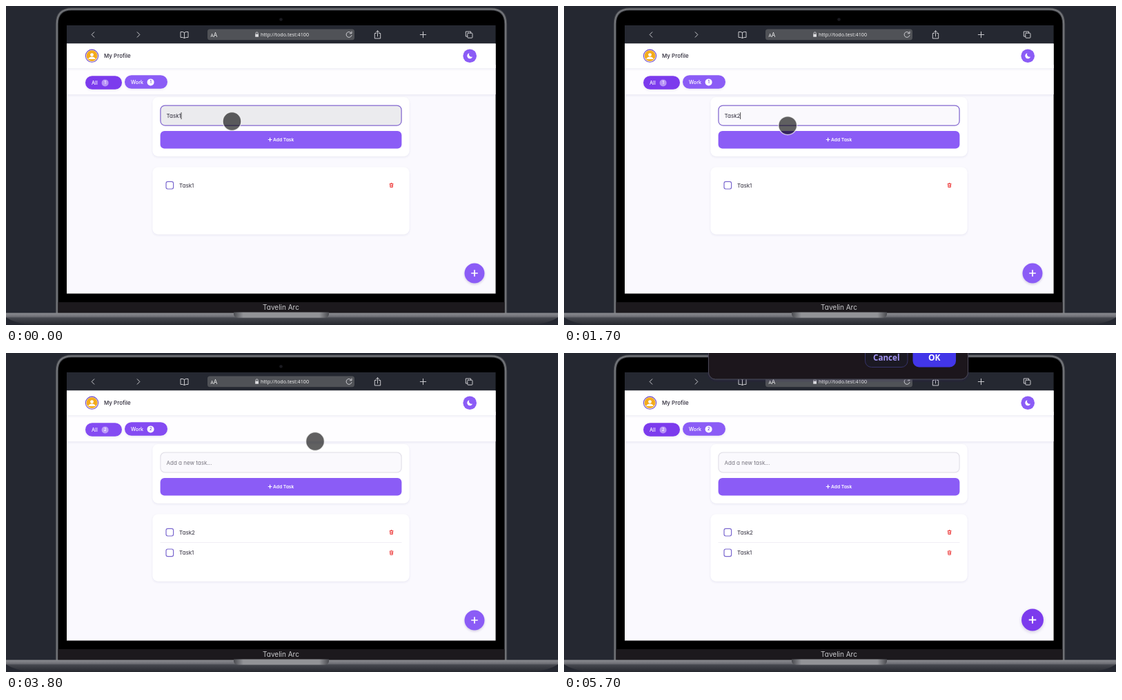
These frames come from a looping animation (800 by 462 pixels, 8000 ms). An HTML page:

```html
<!DOCTYPE html>
<html lang="en">
<head>
<meta charset="utf-8">
<title>Task list</title>
<style>
  html, body { margin: 0; width: 100%; height: 100%; overflow: hidden; background: #252831; }
  svg { display: block; width: 100vw; height: 100vh; }
  text { font-family: Inter, sans-serif; font-size: 8px; font-feature-settings: "cv11"; fill: #2c2938; white-space: pre; }
  .mid { text-anchor: middle; }
  .tab { font-size: 7.2px; font-weight: 500; fill: #fff; }
  .badge { font-size: 5.5px; font-weight: 600; text-anchor: middle; }
  .bar { fill: none; stroke: #d2d2d6; stroke-width: .95; stroke-linecap: round; stroke-linejoin: round; }
  .wide, .wide text { font-family: "Noto Sans", sans-serif; }
</style>
</head>
<body>
<svg viewBox="0 0 800 462">
  <defs>
    <linearGradient id="base" x2="0" y2="1">
      <stop offset="0" stop-color="#8b8c91"/><stop offset=".3" stop-color="#707177"/>
      <stop offset=".42" stop-color="#45474e"/><stop offset="1" stop-color="#26282f"/>
    </linearGradient>
    <linearGradient id="lip">
      <stop offset="0" stop-color="#4a4b50"/><stop offset=".1" stop-color="#929397"/>
      <stop offset=".9" stop-color="#929397"/><stop offset="1" stop-color="#4a4b50"/>
    </linearGradient>
    <filter id="soft" x="-20%" y="-40%" width="140%" height="200%">
      <feDropShadow dx="0" dy="1.3" stdDeviation="1.8" flood-color="#3b2a70" flood-opacity=".09"/>
    </filter>
    <filter id="lift" x="-40%" y="-40%" width="180%" height="200%">
      <feDropShadow dx="0" dy="1.5" stdDeviation="1.8" flood-color="#3b2a70" flood-opacity=".22"/>
    </filter>
    <clipPath id="page"><rect x="88" y="54.6" width="621.6" height="362"/></clipPath>
    <g id="trash" fill="none" stroke="#ef4444" stroke-width=".95">
      <path d="M-2.8-2.2H2.8M-1-3.1H1M-2.1-2L-1.7 2.9H1.7L2.1-2M-.7-1V2M.7-1V2"/>
    </g>
    <rect id="check" x="-5.3" y="-5.3" width="10.6" height="10.6" rx="2.4" fill="#fff" stroke="#7b68cf" stroke-width="1.2"/>
    <path id="shell" d="M73.8 446V26Q73.8 4.6 95 4.6H703Q724.2 4.6 724.2 26V446Z"/>
  </defs>

  <!-- laptop -->
  <rect width="800" height="462" fill="#252831"/>
  <use href="#shell" fill="#000" stroke="#42444a" stroke-width="4"/>
  <use href="#shell" fill="none" stroke="#74767a" stroke-width="2"/>
  <rect x="75.5" y="429" width="647" height="16" fill="#1c191d"/>
  <circle cx="398.5" cy="19.5" r="2.3" fill="#1a1a20"/>
  <text class="mid" x="398.5" y="440.3" style="font-size:10px;fill:#c9c9cc">Tavelin Arc</text>
  <path d="M0 444.5H800V451Q786 460 762 462H38Q14 460 0 451Z" fill="url(#base)"/>
  <path d="M330 443.5H468V447Q467 451.5 461 451.5H337Q331 451.5 330 447Z" fill="url(#lip)"/>

  <!-- browser bar -->
  <rect x="88" y="28" width="621.6" height="27" fill="#252831"/>
  <rect x="292" y="33.5" width="213" height="15.7" rx="3.5" fill="#505257"/>
  <g class="bar">
    <path d="M127.8 37.8L124.2 41.5L127.8 45.2M190.2 37.8L193.8 41.5L190.2 45.2"/>
    <path d="M258.5 38.5Q256 36.8 253 37.5V45.5Q256 45 258.5 46.5Q261 45 264 45.5V37.5Q261 36.8 258.5 38.5V46.5"/>
    <path d="M500.6 39.4A4 4 0 1 0 501 42.5M501 37V39.8H498.2"/>
    <path d="M536.5 39.5H534.3V47H542.7V39.5H540.5M538.5 44V36M536.2 38L538.5 35.8L540.8 38"/>
    <path d="M604.5 37.3V45.7M600.3 41.5H608.7"/>
    <path d="M668.8 44H666.3V37H673.6V39.2"/>
    <rect x="668.8" y="39.2" width="7.2" height="7" rx="1"/>
    <path d="M362 40.8V39.5A1.6 1.6 0 0 1 365.2 39.5V40.8"/>
  </g>
  <rect x="361.2" y="40.8" width="4.8" height="4" rx=".6" fill="#dddde0"/>
  <g class="wide">
    <text x="296.5" y="45" style="font-size:6.5px;fill:#eee">A<tspan font-size="8.5">A</tspan></text>
    <text x="369" y="44.2" style="font-size:7.2px;fill:#eee">http://todo.test:4100</text>
  </g>

  <!-- page -->
  <g clip-path="url(#page)">
    <rect x="88" y="54" width="622" height="363" fill="#faf9fe"/>
    <rect x="80" y="85" width="640" height="43" fill="#fefdff" filter="url(#soft)"/>
    <rect x="80" y="50" width="640" height="40" fill="#fff" filter="url(#soft)"/>
    <circle cx="124.5" cy="72.2" r="9.1" fill="#fff" stroke="#6a45c8" stroke-width="1.1"/>
    <circle cx="124.5" cy="72.2" r="7.9" fill="#f3ab1c"/>
    <path d="M119.2 77Q120.2 73.4 124.5 73.4T129.8 77Z" fill="#fff"/>
    <circle cx="124.5" cy="70.6" r="2.4" fill="#fff"/>
    <text x="142" y="75.2" font-weight="500">My Profile</text>
    <circle cx="672.2" cy="72.2" r="9.8" fill="#8b5cf6"/>
    <path d="M671.3 68.2A4.1 4.1 0 1 0 676.2 73.6A4 4 0 0 1 671.3 68.2Z" fill="#fff"/>

    <g filter="url(#soft)">
      <rect id="all" x="115" y="101.2" width="53" height="19.6" rx="9.8"/>
      <rect id="work" x="172" y="100.2" width="62" height="19.6" rx="9.8"/>
    </g>
    <text class="tab" x="124" y="113.8">All</text>
    <circle cx="143.6" cy="111.4" r="5" fill="#fff" fill-opacity=".45"/>
    <text class="badge count" x="143.6" y="113.4" style="fill:#fff"></text>
    <text class="tab" x="181" y="112.5">Work</text>
    <circle cx="209.6" cy="110.4" r="5" fill="#fff"/>
    <text class="badge count" x="209.6" y="112.4" style="fill:#6d3fd8"></text>

    <rect x="212.5" y="132" width="372" height="85.5" rx="8" fill="#fff" filter="url(#soft)"/>
    <rect id="field" x="223.9" y="144" width="349.2" height="29" rx="6.5"/>
    <text id="entry" x="232.5" y="161.7"></text>
    <path id="caret" stroke="#222" stroke-width=".8"/>
    <g id="add">
      <rect id="addBox" x="223.6" y="181.1" width="349.8" height="25.4" rx="6"/>
      <path d="M382.6 190.7V196.3M379.8 193.5H385.4" stroke="#fff" stroke-width="1.2"/>
      <text x="387" y="196" style="font-size:6.7px;font-weight:600;fill:#fff">Add Task</text>
    </g>

    <rect x="212.5" y="233.5" width="372" height="97" rx="8" fill="#fff" filter="url(#soft)"/>
    <path id="rule" d="M223.5 274.5H573.5" stroke="#f0eef5"/>
    <g id="rows"></g>

    <g id="fab">
      <circle id="fabDisc" r="14.5" filter="url(#lift)"/>
      <path d="M-4.8 0H4.8M0-4.8V4.8" stroke="#fff" stroke-width="1.7"/>
    </g>
  </g>

  <!-- pointers -->
  <circle id="dot" r="13.4" fill="#000" fill-opacity=".62" stroke="#fff" stroke-opacity=".7" stroke-width="1.4"/>
  <path id="hand" d="M676.4 399V389.6Q677.8 387 679.4 389.6V394.4Q681.4 393.2 682.2 394.8Q684.2 393.8 684.9 395.6Q687.2 395 687.3 397.6Q687.6 401 685.8 403V405.2H678.6V403.4Q675.6 400.6 673.8 397.4Q674.4 395.4 676.4 399Z" fill="#000" stroke="#000" stroke-width=".7" stroke-linejoin="round"/>

  <!-- dialog -->
  <g id="dialog" class="wide">
    <rect x="209.5" y="-30" width="376" height="68" rx="10" fill="#1a171f" stroke="#4b4955" filter="url(#lift)"/>
    <rect x="436.5" y="-12" width="61.5" height="32.5" rx="9" fill="#1b1923" stroke="#35336a"/>
    <rect x="505.5" y="-12" width="62.5" height="32.5" rx="9" fill="#4236e8"/>
    <text class="mid" x="467.3" y="11" style="font-size:11.6px;font-weight:600;fill:#a394f5">Cancel</text>
    <text class="mid" x="536.7" y="11" style="font-size:12px;font-weight:600;fill:#fff">OK</text>
  </g>
</svg>
<script>
const LOOP = 8000, STEP = 100;
const $ = id => document.getElementById(id);
const counts = document.querySelectorAll('.count');
const LIGHT = [139, 92, 246], DEEP = [124, 58, 237];

// time, x, y
const route = [
  [0, 327.5, 167], [1300, 326.7, 167], [1600, 326.7, 167], [1900, 317, 190.5],
  [2400, 317, 191], [2800, 196, 104], [2900, 193, 110], [3100, 193, 110],
  [3400, 142, 111], [3600, 142, 111], [3800, 448, 128], [4600, 674, 373], [4900, 679, 388]
];

const mix = (a, b, k) => a + (b - a) * k;
const blend = (a, b, k) => `rgb(${a.map((v, i) => Math.round(mix(v, b[i], k)))})`;
const purple = k => blend(LIGHT, DEEP, k);
const show = (el, on) => el.setAttribute('visibility', on ? 'visible' : 'hidden');

function ramp(t, from, to) {
  const k = Math.min(1, Math.max(0, (t - from) / (to - from)));
  return k * k * (3 - 2 * k);
}

function along(t) {
  const i = route.findIndex(p => p[0] > t);
  if (i < 0) return route[route.length - 1].slice(1);
  const a = route[i - 1], b = route[i], k = ramp(t, a[0], b[0]);
  return [mix(a[1], b[1], k), mix(a[2], b[2], k)];
}

function typed(t) {
  if (t >= 2000) return '';
  if (t >= 800) return 'Task2';
  return t >= 500 ? 'Task' : 'Task1';
}

function row(name, y, alpha) {
  return `<g opacity="${alpha}" transform="translate(0 ${y})">
    <use href="#check" x="237.3"/><text x="251" y="2.9">${name}</text><use href="#trash" x="558.6"/></g>`;
}

function drawField(t) {
  const value = typed(t), focus = t < 3000, entry = $('entry');
  entry.textContent = value || 'Add a new task...';
  entry.style.fill = value ? '#2c2938' : '#77757f';
  $('field').setAttribute('fill', blend([235, 235, 238], [250, 249, 253], ramp(t, 100, 500)));
  $('field').setAttribute('stroke', focus ? '#8267cf' : '#dfdde6');
  $('field').setAttribute('stroke-width', focus ? 1.25 : 1.1);
  const x = 232.7 + (value ? entry.getComputedTextLength() : 0);
  $('caret').setAttribute('d', `M${x} 154V164`);
  show($('caret'), focus && (t < 2000 || (t - 2000) % 1000 < 500));
}

function drawList(t) {
  const both = t >= 2000, k = both ? ramp(t, 1900, 2400) : 1, drop = 5 * (1 - k);
  const names = both ? ['Task2', 'Task1'] : ['Task1'];
  $('rows').innerHTML = names.map((n, i) => row(n, 259.7 + 29.6 * i + drop, 0.35 + 0.65 * k)).join('');
  show($('rule'), both);
  $('rule').setAttribute('transform', `translate(0 ${drop})`);
  counts.forEach(el => el.textContent = names.length);
}

function draw(t) {
  drawField(t);
  drawList(t);

  const press = ramp(t, 1700, 2000) - ramp(t, 2400, 2700);
  $('add').setAttribute('transform', `translate(0 ${-press})`);
  $('addBox').setAttribute('fill', purple(press));

  const work = ramp(t, 3000, 3300) - ramp(t, 3600, 4000);
  $('all').setAttribute('fill', purple(1 - work));
  $('work').setAttribute('fill', purple(work));

  const hover = ramp(t, 4600, 5000);
  $('fab').setAttribute('transform', `translate(679 ${387 - 0.5 * hover}) scale(${1 + 0.1 * hover})`);
  $('fabDisc').setAttribute('fill', purple(hover));

  const [x, y] = along(t);
  $('dot').setAttribute('transform', `translate(${x} ${y})`);
  show($('dot'), t < 4900);
  show($('hand'), t >= 4900 && t < 5500);
  show($('dialog'), t >= 5500);
}

let last = -1;
function tick(now) {
  const t = Math.floor(now % LOOP / STEP) * STEP;
  if (t !== last) draw(last = t);
  requestAnimationFrame(tick);
}
draw(0);
requestAnimationFrame(tick);
</script>
</body>
</html>
```
